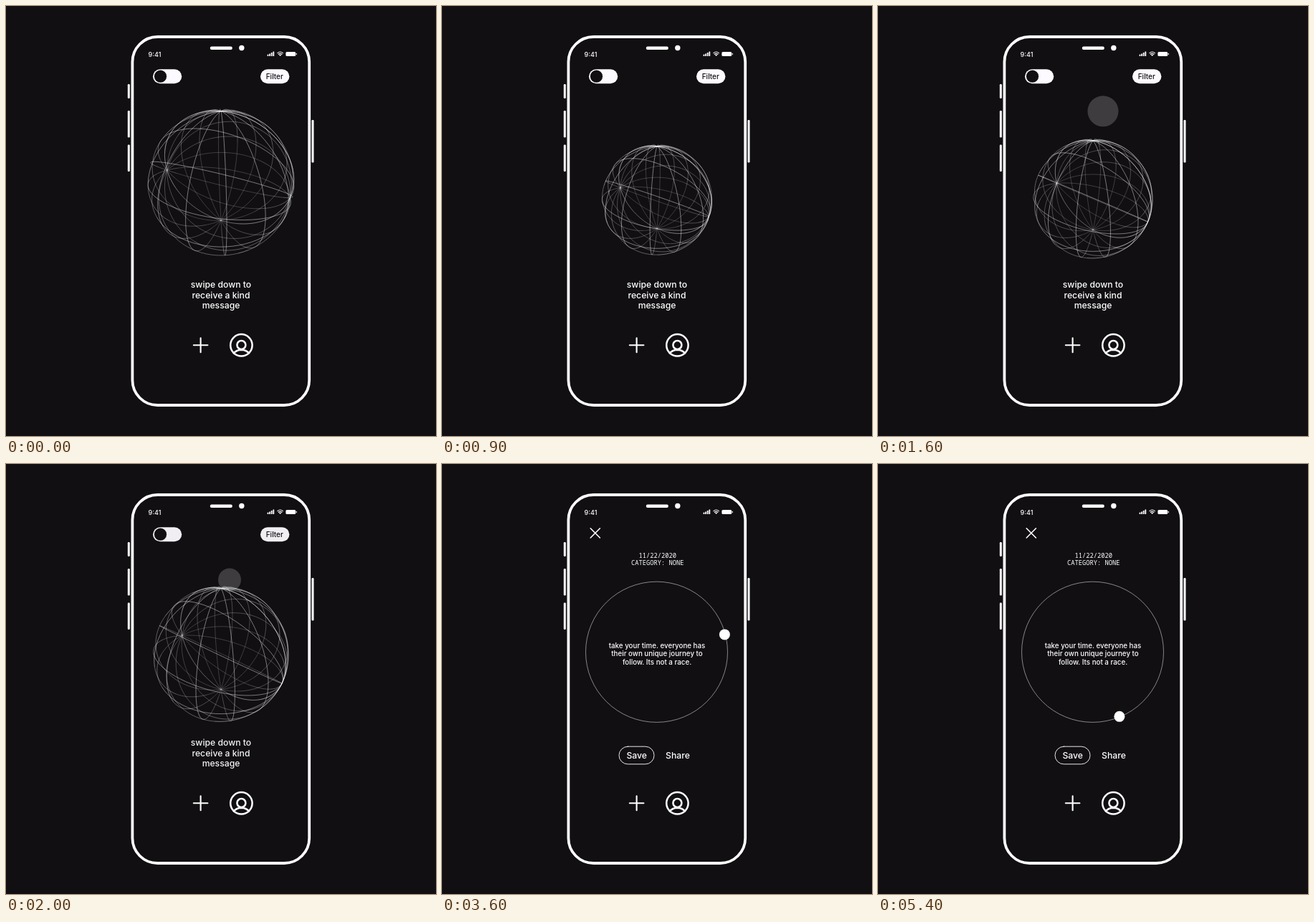
Write an HTML page that moves like this. It is 600 by 600 pixels and loops after 5.5 s.

```html
<!DOCTYPE html>
<html lang="en">
<head>
<meta charset="utf-8">
<title>Kind messages</title>
<style>
  html, body { margin: 0; width: 100%; height: 100%; overflow: hidden; background: #110f12; }
  svg { display: block; width: 100vw; height: 100vh; }
  text { font-family: Inter, sans-serif; font-weight: 500; fill: #fff; }
  .mid { text-anchor: middle; }
  .mono text { font: 400 8.75px "Noto Sans Mono", monospace; }
  .line { fill: none; stroke: #fff; stroke-linecap: round; stroke-linejoin: round; }
</style>
</head>
<body>
<svg viewBox="0 0 600 600">
  <rect width="600" height="600" fill="#110f12"/>

  <!-- phone body -->
  <rect class="line" x="176.4" y="43" width="246.8" height="514" rx="35" stroke-width="3.8"/>
  <g fill="#fff">
    <rect x="169.8" y="109" width="3" height="20" rx="1.3"/>
    <rect x="169.8" y="146" width="3" height="37.5" rx="1.3"/>
    <rect x="169.8" y="193.5" width="3" height="37.5" rx="1.3"/>
    <rect x="426.5" y="159" width="3" height="59.5" rx="1.3"/>
    <rect x="284.8" y="56.5" width="31" height="4.6" rx="2"/>
    <circle cx="328.8" cy="58.5" r="3.7"/>
  </g>

  <!-- status bar -->
  <text x="198.6" y="71.2" font-size="9">9:41</text>
  <g fill="#fff">
    <rect x="364.6" y="67.6" width="1.8" height="2.4" rx=".4"/>
    <rect x="367.2" y="66.4" width="1.8" height="3.6" rx=".4"/>
    <rect x="369.8" y="65" width="1.8" height="5" rx=".4"/>
    <rect x="372.4" y="63.4" width="1.8" height="6.6" rx=".4"/>
    <path d="M380.9 68.3 Q382.6 67 384.3 68.3 L382.6 70Z"/>
    <rect x="390.4" y="64" width="13.8" height="6" rx="1.6"/>
    <rect x="404.8" y="65.8" width="1" height="2.4" rx=".5"/>
  </g>
  <path class="line" stroke-width="1.2" d="M378.9 65.6 Q382.6 62.4 386.3 65.6 M380.3 67.3 Q382.6 65.4 384.9 67.3"/>

  <!-- bottom bar -->
  <path class="line" stroke-width="2.1" d="M261.8 473.3H281.4 M271.6 463.4V483.2"/>
  <g class="line" stroke-width="2.5">
    <circle cx="328.4" cy="473.3" r="15.2"/>
    <circle cx="328.4" cy="473" r="6"/>
    <path d="M317.8 484.4 Q321.6 480 328.4 479.8 Q335.2 480 339 484.4"/>
  </g>

  <!-- home screen -->
  <g id="home">
    <rect x="205" y="88.2" width="40.2" height="20" rx="10" fill="#fcfafe"/>
    <circle cx="215.5" cy="98.2" r="8.6" fill="#110f12"/>
    <rect x="355" y="88.2" width="40.4" height="20" rx="10" fill="#fcfafe"/>
    <text class="mid" x="374.8" y="102" font-size="10" style="fill:#110f12">Filter</text>
    <g class="mid" font-size="12.2">
      <text x="300" y="393">swipe down to</text>
      <text x="300" y="407.5">receive a kind</text>
      <text x="300" y="422">message</text>
    </g>
  </g>
  <circle id="tap" fill="#fff"/>
  <g id="globe" fill="none" stroke="#fff" stroke-width=".7"></g>

  <!-- message screen -->
  <ellipse id="ring" fill="none" stroke="#fff" stroke-width=".9" stroke-opacity=".55"/>
  <g id="note">
    <path class="line" stroke-width="1.6" d="M207.2 89.8L220.4 103 M220.4 89.8L207.2 103"/>
    <g class="mono mid">
      <text x="300.7" y="131">11/22/2020</text>
      <text x="300.7" y="141">CATEGORY: NONE</text>
    </g>
    <g class="mid" font-size="9.77">
      <text x="300" y="256.6">take your time. everyone has</text>
      <text x="300" y="268.1">their own unique journey to</text>
      <text x="300" y="279.6">follow. Its not a race.</text>
    </g>
    <rect class="line" x="247" y="394.2" width="49" height="24.6" rx="12.3" stroke-width=".9"/>
    <g class="mid" font-size="12.2">
      <text x="271.7" y="410.7">Save</text>
      <text x="329" y="410.7">Share</text>
    </g>
  </g>
  <circle id="ball" r="7.5" fill="#fff"/>
</svg>

<script>
const LOOP = 5500, STEP = 100, RAD = Math.PI / 180;
const el = id => document.getElementById(id);
const [home, tap, globe, ring, note, ball] =
  ['home', 'tap', 'globe', 'ring', 'note', 'ball'].map(el);

function set(node, attrs) {
  for (const key in attrs) node.setAttribute(key, attrs[key]);
}
// smooth 0..1 ramp between times a and b
function ramp(t, a, b) {
  const u = Math.min(1, Math.max(0, (t - a) / (b - a)));
  return u * u * (3 - 2 * u);
}
const mix = (a, b, u) => a + (b - a) * u;

// Wire globe: two sets of great circles around perpendicular axes.
const CAMERA = 2.1, TILT_SIN = 0.635, TILT_COS = Math.sqrt(1 - TILT_SIN ** 2);
const CIRCLES = 8, SEGMENTS = 96;
const SHADES = [0.27, 0.35, 0.46, 0.62];
const wires = [];
for (let i = 0; i < CIRCLES * 2; i++) {
  wires.push(SHADES.map(shade => {
    const path = document.createElementNS('http://www.w3.org/2000/svg', 'path');
    path.setAttribute('stroke-opacity', shade);
    return globe.appendChild(path);
  }));
}
const blend = (p, q, a) => p.map((v, i) => v * Math.cos(a) + q[i] * Math.sin(a));

function drawGlobe(cx, cy, radius, spin) {
  const focal = radius * Math.sqrt(CAMERA ** 2 - 1);
  const side = [1, 0, 0], front = [0, -TILT_SIN, TILT_COS];
  const pole = [0, TILT_COS, TILT_SIN];
  const axis = blend(side, front, spin);
  const third = blend(side, front, spin + Math.PI / 2);

  wires.forEach((paths, i) => {
    const turn = (i % CIRCLES) * Math.PI / CIRCLES;
    const first = i < CIRCLES ? pole : axis;
    const second = i < CIRCLES ? blend(axis, third, turn) : blend(pole, third, turn);
    const d = SHADES.map(() => '');
    let last = '', used = -1;
    for (let k = 0; k <= SEGMENTS; k++) {
      const [x, y, z] = blend(first, second, k / SEGMENTS * 2 * Math.PI);
      const s = focal / (CAMERA - z);
      const point = (cx + x * s).toFixed(2) + ' ' + (cy - y * s).toFixed(2);
      if (k) {
        const n = Math.min(3, Math.floor((z + 1) * 2));
        d[n] += (n === used ? '' : 'M' + last) + 'L' + point;
        used = n;
      }
      last = point;
    }
    paths.forEach((path, n) => path.setAttribute('d', d[n]));
  });
}

function draw(ms) {
  const t = ms / 1000;

  const shrink = ramp(t, 0, 1), grow = ramp(t, 1.2, 2.2), leave = ramp(t, 2.2, 2.87);
  const size = mix(mix(102, 76, shrink) + 20.5 * grow, 0, leave);
  const cx = mix(300, 304, leave);
  const cy = mix(mix(246, 271.2, shrink) - 6.6 * grow, 253.5, leave);
  const seen = 1 - ramp(t, 2.2, 2.8);
  set(globe, { opacity: seen, display: seen > 0 ? 'inline' : 'none' });
  if (seen > 0) drawGlobe(cx, cy, size, (19.5 + 8.8 * t) * RAD);

  const drag = Math.max(0, (t - 1.4) / 0.6) ** 2;
  set(tap, {
    cx: 314.2 - 2.2 * drag, cy: 145 + 16.5 * drag,
    r: Math.max(0, 22.2 - 6.2 * drag),
    opacity: 0.19 * ramp(t, 1.25, 1.5) * (1 - ramp(t, 2, 2.3))
  });

  home.setAttribute('opacity', 1 - ramp(t, 1.94, 2.4));
  note.setAttribute('opacity', ramp(t, 2.65, 3.3));

  // the ring is squashed by the swipe, then settles
  const squash = ramp(t, 2.15, 2.5) * (1 - ramp(t, 2.6, 3.3));
  const rx = mix(299.5, 294.5, squash), ry = mix(262.3, 276.5, squash);
  set(ring, {
    cx: rx, cy: ry, rx: mix(99, 98.8, squash), ry: mix(98.1, 86, squash),
    transform: `rotate(${22.5 * squash} ${rx} ${ry})`,
    opacity: ramp(t, 2.1, 2.45)
  });

  const angle = (-14.5 + 45.6 * (t - 3.6)) * RAD;
  set(ball, {
    cx: 299.5 + 98 * Math.cos(angle), cy: 262.3 + 97.4 * Math.sin(angle),
    opacity: ramp(t, 3, 3.4)
  });
}

const start = performance.now();
function frame() {
  const ms = (performance.now() - start) % LOOP;
  draw(Math.floor(ms / STEP) * STEP);
  requestAnimationFrame(frame);
}
frame();
</script>
</body>
</html>
```
